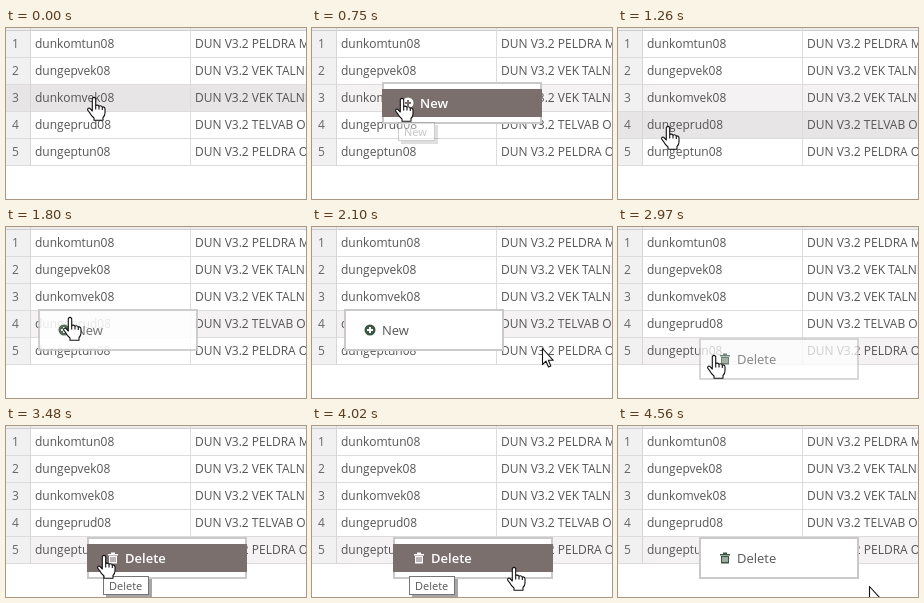
An HTML page with a canvas for the animation above (4590 ms loop, 300x171 px).

```html
<!DOCTYPE html>
<html lang="en">
<head>
<meta charset="utf-8">
<title>Table context menu</title>
<style>
html, body { margin: 0; height: 100%; overflow: hidden; background: #fff; }
canvas { display: block; width: 300px; height: 171px; }
</style>
</head>
<body>
<canvas id="stage" width="300" height="171"></canvas>
<script>
const LOOP = 4590, ROW = 27, TOP = 2;
const ctx = document.getElementById('stage').getContext('2d');
const clamp = v => Math.max(0, Math.min(1, v));

const rows = [
  ['dunkomtun08', 'DUN V3.2 PELDRA M'],
  ['dungepvek08', 'DUN V3.2 VEK TALNER'],
  ['dunkomvek08', 'DUN V3.2 VEK TALNER'],
  ['dungeprud08', 'DUN V3.2 TELVAB O'],
  ['dungeptun08', 'DUN V3.2 PELDRA O']
];

// sel: the row turns pale; hot: the item reacts to the pointer; tipFade: tooltip fade in ms
const menus = [
  { row: 2, x: 70, y: 54, label: 'New', open: 420, sel: 750, hot: 750, close: 930, tip: [86, 94, 37], tipFade: 200 },
  { row: 3, x: 32, y: 82, label: 'New', open: 1650, sel: 1650, hot: Infinity, close: 2220 },
  { row: 4, x: 81, y: 111, label: 'Delete', open: 2850, sel: 2850, hot: 3180, close: Infinity, tip: [97, 150, 46], tipFade: 1 }
];

// time, x, y, vertical bow of the path leading here
const path = [
  [0, 89, 69, 0], [720, 89, 69, 0], [750, 91, 70, 0], [870, 91, 70, 0],
  [1260, 51, 98, 0], [1740, 51, 98, 0], [2100, 230, 121, -40],
  [2220, 230, 121, 0], [2670, 97, 128, 9], [3450, 97, 128, 0],
  [3480, 99, 129, 0], [3990, 203, 141, 0], [4020, 203, 141, 0],
  [4320, 258, 157, 0], [4500, 251, 160, 0], [LOOP, 251, 160, 0]
];

const handShape = new Path2D('M-1.7 1.6Q0-.8 1.7 1.6V8.6Q3.5 7.4 5 9.2Q7 8 8.3 10Q10.6 9.4 11 12V16Q11 18.5 9 20.5V23.3H0V21Q-2.6 19-4 16.2L-6.4 13Q-6.4 10.6-4.4 11.2L-1.7 14Z');
const handLines = new Path2D('M1.7 8.6V12.5M5 9.2V12.5M8.3 10V13');
const arrowShape = new Path2D('M.5.5V16.5L4 13.2L6.5 19L8.8 18L6.4 12.3H11.3Z');
const trashShape = new Path2D('M-5-4H-2V-5.5H2V-4H5V-2.5H-5ZM-4-2H4V5.5H-4Z');

function box(x, y, w, h, color) {
  ctx.fillStyle = color;
  ctx.fillRect(x, y, w, h);
}

// The border lies inside the box and never under the fill, so both fade evenly.
function framed(x, y, w, h, line, color) {
  box(x + line, y + line, w - 2 * line, h - 2 * line, '#fff');
  ctx.strokeStyle = color;
  ctx.lineWidth = line;
  ctx.strokeRect(x + line / 2, y + line / 2, w - line, h - line);
}

function text(str, x, y, size, color, weight = 400) {
  ctx.font = `${weight} ${size}px "Open Sans", sans-serif`;
  ctx.fillStyle = color;
  ctx.fillText(str, x, y);
}

function pointerAt(t) {
  const i = path.findIndex(p => p[0] > t);
  const [t0, x0, y0] = path[i - 1], [t1, x1, y1, bow] = path[i];
  const u = (t - t0) / (t1 - t0), e = u * u * (3 - 2 * u);
  return {
    x: x0 + (x1 - x0) * e,
    y: y0 + (y1 - y0) * e + bow * Math.sin(Math.PI * e)
  };
}

function drawTable(hover, selected) {
  box(0, 0, 300, 171, '#fff');
  box(0, 0, 300, TOP, '#ececec');
  rows.forEach(([name, info], i) => {
    const y = TOP + i * ROW;
    if (i === selected) box(25, y, 275, ROW, '#f4f2f2');
    box(0, y, 24, ROW, '#f1f1f1');
    if (i === hover) box(0, y, 300, ROW, '#e7e5e5');
    text(i + 1, 6, y + 18, 12, '#666');
    text(name, 29, y + 18, 12, '#555');
    text(info, 189, y + 18, 12, '#555');
  });
  for (let i = 0; i <= rows.length; i++) box(0, TOP + i * ROW, 300, 1, i ? '#dcdcdc' : '#cfcfcf');
  box(24, 0, 1, 138, '#d6d6d6');
  box(184, 0, 1, 138, '#dcdcdc');
}

function drawIcon(label, color, gap) {
  ctx.save();
  ctx.translate(26, 21);
  ctx.fillStyle = color;
  if (label === 'New') {
    ctx.beginPath();
    ctx.arc(0, 0, 5.5, 0, 7);
    ctx.fill();
    box(-3, -1, 6, 2, gap);
    box(-1, -3, 2, 6, gap);
  } else {
    ctx.fill(trashShape);
    for (const x of [-2.5, -.5, 1.5]) box(x, -1, 1, 5, gap);
  }
  ctx.restore();
}

function drawMenu(m, hot, alpha) {
  ctx.save();
  ctx.globalAlpha = alpha;
  ctx.translate(m.x, m.y);
  framed(0, 0, 160, 42, 2, '#c9c9c9');
  if (hot) box(0, 7, 160, 28, '#7b6f6e');
  drawIcon(m.label, hot ? '#fff' : '#3b5741', hot ? '#7b6f6e' : '#fff');
  text(m.label, 38, 26, 13, hot ? '#fff' : '#555', hot ? 600 : 400);
  ctx.restore();
}

function drawTip({ tip: [x, y, w], label }, alpha) {
  const shade = 'rgba(0,0,0,.35)';
  ctx.save();
  ctx.globalAlpha = alpha;
  box(x + w, y + 3, 3, 19, shade);
  box(x + 3, y + 19, w - 3, 3, shade);
  framed(x, y, w, 19, 1, '#767676');
  text(label, x + 6, y + 14, 11, '#575757');
  ctx.restore();
}

function drawPointer({ x, y }, hand) {
  const shape = hand ? handShape : arrowShape;
  ctx.save();
  ctx.translate(Math.round(x) - (hand ? 1 : 0), Math.round(y));
  ctx.fillStyle = '#fff';
  ctx.strokeStyle = '#111';
  ctx.lineWidth = 1.1;
  ctx.lineJoin = 'round';
  ctx.fill(shape);
  ctx.stroke(shape);
  if (hand) ctx.stroke(handLines);
  ctx.restore();
}

function draw(t) {
  const p = pointerAt(t);
  const menu = menus.find(m => t >= m.open && t < m.close + 150);
  const active = menu && t < menu.close;
  const last = menus.filter(m => t >= m.sel).pop();
  const inItem = active && p.x >= menu.x && p.x < menu.x + 160 && p.y >= menu.y + 7 && p.y < menu.y + 35;
  const hot = inItem && t >= menu.hot;

  let hover = Math.floor((p.y - TOP) / ROW);
  if (active) hover = t < menu.sel ? menu.row : -1;

  drawTable(hover, last && last.row);
  if (menu) {
    const alpha = Math.min(clamp((t - menu.open + 30) / 210), clamp(1 - (t - menu.close) / 150));
    drawMenu(menu, hot, alpha);
  }
  if (hot) drawTip(menu, clamp((t - menu.hot + 70) / menu.tipFade));
  drawPointer(p, active ? inItem : hover < rows.length);
}

function tick() {
  draw(performance.now() % LOOP);
  requestAnimationFrame(tick);
}
tick();
</script>
</body>
</html>
```
